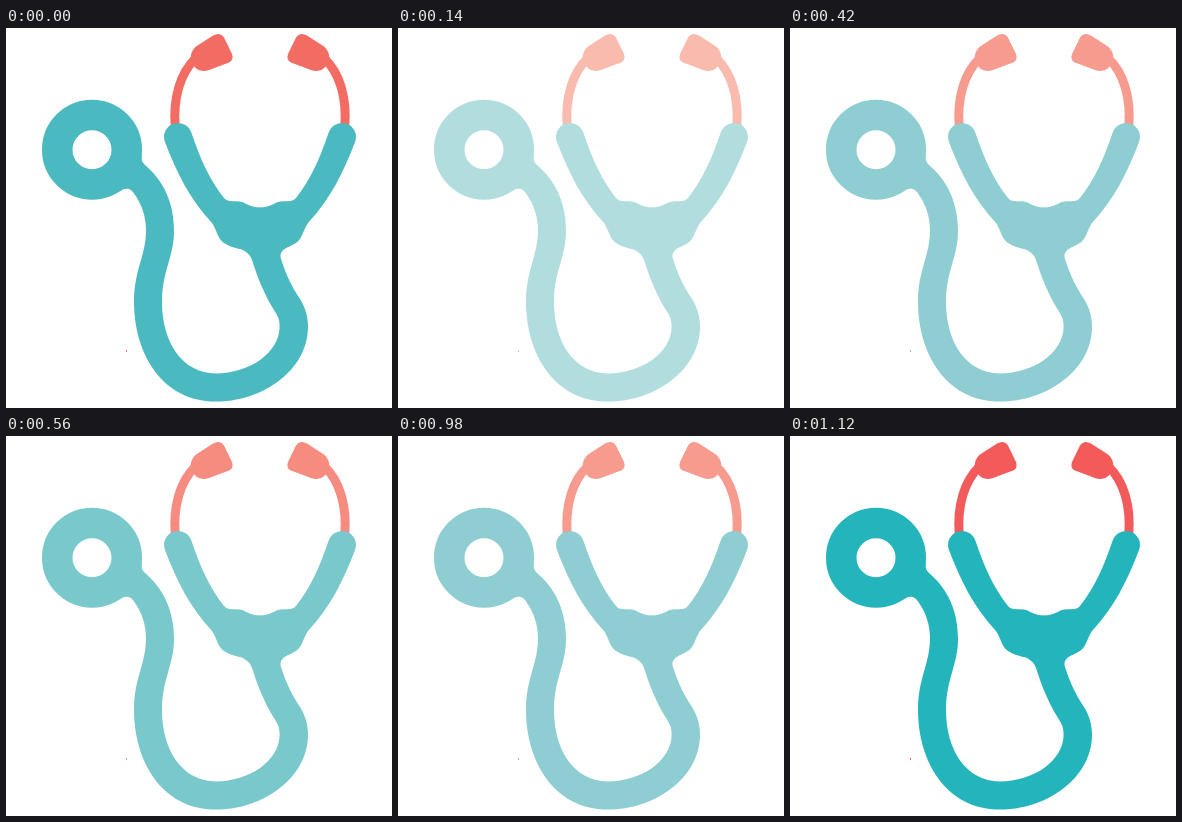
Animation of 386x380 px, one loop 1260 ms. Source, as an HTML page:

```html
<!DOCTYPE html>
<html lang="en">
<head>
<meta charset="utf-8">
<title>Stethoscope</title>
<style>
  html, body { margin: 0; width: 100%; height: 100%; overflow: hidden; background: #fff; }
  svg { display: block; width: 100%; height: 100%; }
  .coral { fill: var(--coral); }
  .teal { fill: var(--teal); }
  .wire { fill: none; stroke: var(--coral); stroke-width: 9; }
  .ring { fill: none; stroke: var(--teal); stroke-width: 30.5; }
</style>
</head>
<body>
<svg id="stage" viewBox="0 0 386 380">
  <defs>
    <g id="half">
      <path class="wire" d="M169.2 99C167 70 174 45 190 30"/>
      <path class="coral" d="M190 18.6L207 7.6Q214 3.6 218 9.6L226 26Q228 32 223 34.6L203 42Q193 45 188 38Q184 33 185 27Q186 22 190 18.6Z"/>
      <path class="teal" d="M158.6 113A14 14 0 1 1 185.5 105C195 133 204 152 218 170
        C222 175 229 172 236 174C242 176 243 179 254.5 179.5L254.5 225L238 222C230 220 224 219 218 215
        C211 210 211 202 206 195C184 171 171 146 158.6 113Z"/>
    </g>
  </defs>
  <use href="#half"/>
  <use href="#half" transform="matrix(-1 0 0 1 508 0)"/>
  <circle class="ring" cx="86" cy="121.7" r="34.75"/>
  <path class="teal" d="M133 119C138 126 133 131 138.5 136.5C158 153 168 175 168 203C168 229 156 243 156 274
    C156 314 176 345.4 210 345.4C243 345.4 273.6 325 273.6 298.5C273.6 290 271 287 268 282C258 266 251 248 246 232
    C244 226 240 224 234 220L284 218C277 221 273 225 275 231C281 249 286 259 294 271C299 279 302 288 302 298.5
    C302 342 257 373.6 210 373.6C155 373.6 128 324 128 274C128 242 140 228 140 202C140 189 136 177 129 167
    C125 160 120 160 116 162L106 167L112 148Z"/>
  <rect class="coral" x="120" y="322" width="1" height="2"/>
</svg>
<script>
const stage = document.getElementById('stage');
const LOOP = 1260;

// tint strength: [teal, coral]
const tints = {
  full:   [[36, 181, 188], [242, 91, 89]],
  strong: [[74, 186, 192], [243, 108, 100]],
  medium: [[100, 193, 198], [245, 125, 114]],
  soft:   [[142, 206, 210], [247, 155, 142]],
  pale:   [[178, 221, 222], [249, 187, 174]]
};

const blend = (a, b) => a.map((c, i) => c.map((v, j) => Math.round((v + b[i][j]) / 2)));

const steps = [
  [0, tints.strong],
  [140, tints.pale],
  [280, blend(tints.pale, tints.soft)],
  [420, tints.soft],
  [560, blend(tints.soft, tints.medium)],
  [700, tints.medium],
  [980, tints.soft],
  [1120, tints.full]
];

function draw(ms) {
  const t = ms % LOOP;
  const [, [teal, coral]] = steps.findLast(([start]) => start <= t);
  stage.style.setProperty('--teal', `rgb(${teal})`);
  stage.style.setProperty('--coral', `rgb(${coral})`);
}

const began = performance.now();
function tick() {
  draw(performance.now() - began);
  requestAnimationFrame(tick);
}
tick();
</script>
</body>
</html>
```
